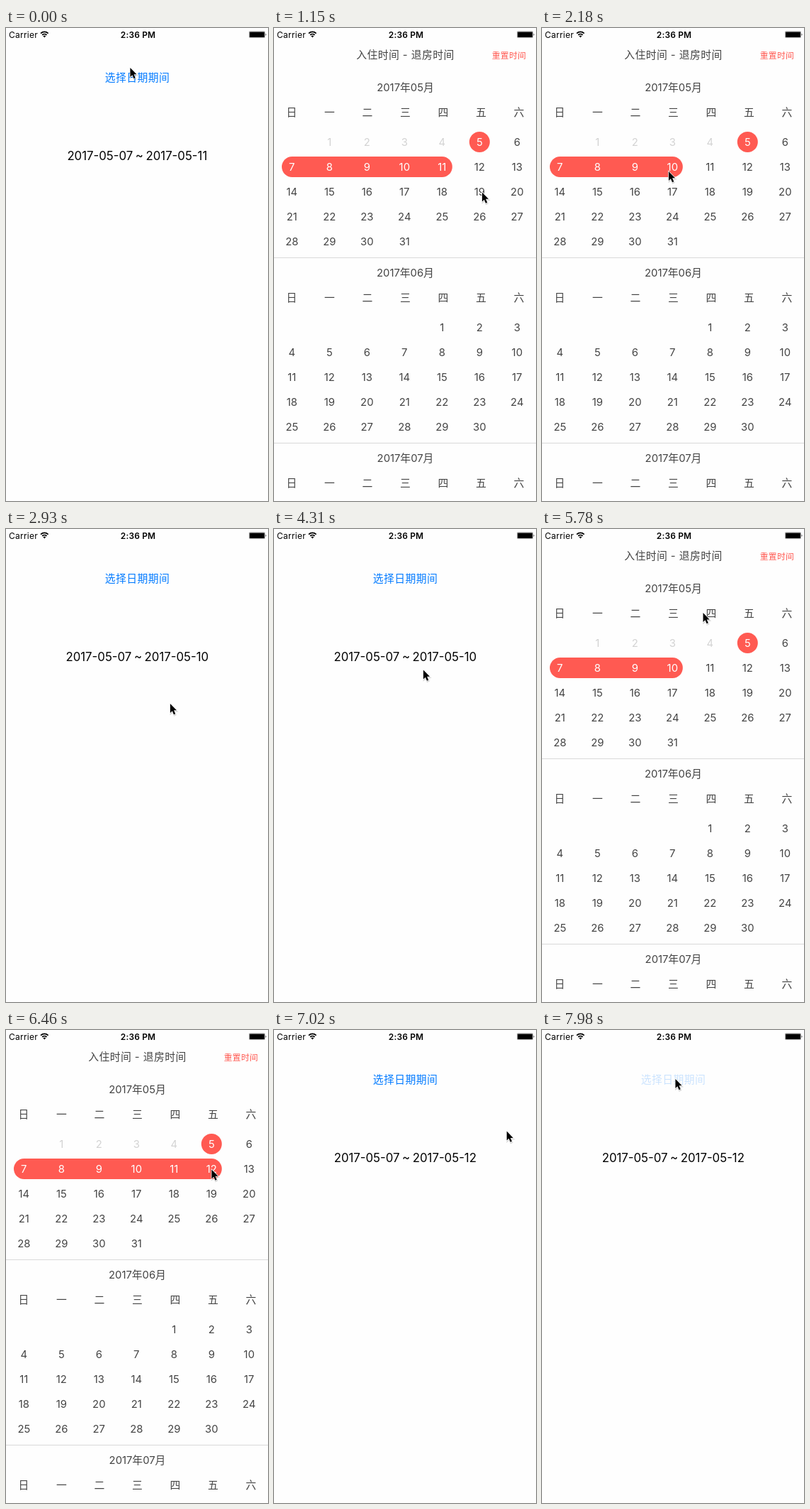
Animation of 370 by 666 pixels, one loop 8000 ms. Source, as an HTML page:

```html
<!DOCTYPE html>
<html lang="zh">
<head>
<meta charset="utf-8">
<title>Date range picker</title>
<style>
  html, body { margin: 0; width: 100%; height: 100%; overflow: hidden; background: #fefefe; }
  svg { display: block; width: 370px; height: 666px; }
  text { font-family: Inter, "Noto Sans CJK SC", "Noto Sans CJK", sans-serif; font-size: 14.8px; fill: #444; text-anchor: middle; }
  .cjk { letter-spacing: .45px; }
</style>
</head>
<body>
<svg viewBox="0 0 370 666">
  <defs>
    <clipPath id="reveal"><rect id="mask" width="370" height="0"/></clipPath>
    <path id="arrow" d="M0 0V15.2L3.4 12L5.9 17.8L8.5 16.7L6 11H10.6Z"/>
  </defs>
  <rect width="370" height="666" fill="#fefefe"/>
  <g id="home"></g>
  <g id="panel" clip-path="url(#reveal)"><rect width="370" height="666" fill="#fefefe"/></g>
  <g id="status">
    <path d="M49 7.6a7.6 7.6 0 0 1 10.6 0M51.1 9.8a4.7 4.7 0 0 1 6.4 0" fill="none" stroke="#000" stroke-width="1.7"/>
    <path d="M54.3 13.4l-2-2.1a3 3 0 0 1 4 0z"/>
    <rect x="343.3" y="4.8" width="22.4" height="8.8" rx="1.2" fill="none" stroke="#777" stroke-width=".6"/>
    <rect x="344" y="5.5" width="21" height="7.4" rx=".5"/>
    <path d="M366.6 7.4q1.8 1.8 0 3.6z"/>
  </g>
  <g id="cursor">
    <g transform="translate(.9 .9) scale(.86)">
      <use href="#arrow" x=".6" y="1.6" stroke="#000" stroke-width="2" opacity=".15"/>
      <use href="#arrow" stroke="#fff" stroke-width="1.6" paint-order="stroke"/>
    </g>
  </g>
</svg>
<script>
const $ = id => document.getElementById(id);
const LOOP = 8000, RED = '#ff5a52', HEADER = 140, FULL = 666, SLIDE = 160;
const clamp = u => Math.min(1, Math.max(0, u));
const smooth = u => u * u * (3 - 2 * u);

function add(parent, tag, attrs, text) {
  const el = document.createElementNS('http://www.w3.org/2000/svg', tag);
  for (const k in attrs) el.setAttribute(k, attrs[k]);
  if (text !== undefined) el.textContent = text;
  return parent.appendChild(el);
}
const label = (parent, x, y, text, style = '', cls = '') =>
  add(parent, 'text', { x, y, style, class: cls }, text);

// Status bar and first screen
label($('status'), 4, 13.7, 'Carrier', 'font-size:12px;fill:#000;text-anchor:start;letter-spacing:.25px');
label($('status'), 186.5, 13.7, '2:36 PM', 'font-size:11.9px;font-weight:600;fill:#000;letter-spacing:.2px');
const button = label($('home'), 185.6, 74.6, '选择日期期间', 'fill:#007aff', 'cjk');
const range = label($('home'), 185.3, 185.8, '', 'font-size:16.77px;fill:#000;word-spacing:-1.1px');

// Calendar
const panel = $('panel'), colX = c => 25.3 + 53 * c, rowY = r => 160.5 + 35 * r;
label(panel, 185.5, 43.4, '入住时间 - 退房时间', '', 'cjk');
label(panel, 332, 42.6, '重置时间', `font-size:11.84px;fill:${RED};letter-spacing:.3px`);
add(panel, 'circle', { cx: colX(5), cy: rowY(0), r: 14.5, fill: RED });
const bar = add(panel, 'rect', { x: 11, y: 181, height: 29, rx: 14.5, fill: RED });

const days = [];
for (let m = 0; m < 3; m++) {
  const top = 261 * m, month = 5 + m;
  const first = new Date(2017, month - 1, 1).getDay();
  const count = new Date(2017, month, 0).getDate();
  if (m) add(panel, 'rect', { x: 0, y: top + 62, width: 370, height: 1, fill: '#d9d9d9' });
  label(panel, 185.5, top + 89.3, `2017年0${month}月`);
  [...'日一二三四五六'].forEach((d, c) => label(panel, 25 + 53.5 * c, top + 124.3, d));
  for (let d = 1; d <= count; d++) {
    const cell = first + d - 1;
    const el = label(panel, colX(cell % 7), top + rowY(Math.floor(cell / 7)) + 5.4, d);
    if (!m) days[d] = el;
  }
}

// Each visit to the calendar picks a new last day
const visits = [
  { press: 410, open: 480, pick: 2180, close: 2600, day: 10 },
  { press: 5160, open: 5340, pick: 6460, close: 6560, day: 12 },
  { press: 7870, open: LOOP, pick: LOOP, close: LOOP }
];
const dayAt = (t, event) => visits.reduce((day, v) => t >= v[event] ? v.day : day, 11);

// The header shows at once, the rows unroll below it and roll up again
function panelHeight(t) {
  const v = visits.find(v => t >= v.open && t < v.close + SLIDE);
  if (!v) return 0;
  const u = t < v.close ? clamp((t - v.open) / SLIDE) : 1 - (t - v.close) / SLIDE;
  return HEADER + (FULL - HEADER) * u ** 3;
}

// Pointer moves: start, end, x, y, sideways bend
const moves = [
  [60, 170, 176, 65, 0],
  [880, 1150, 293, 230.5, .85],
  [1150, 1590, 176.5, 196, 0],
  [1710, 1880, 178, 201, 0],
  [2680, 2930, 231, 245, 0],
  [2930, 3400, 221, 250, 0],
  [3450, 4310, 210, 197.5, 0],
  [4600, 5100, 186.5, 67, 0],
  [5500, 6160, 289.5, 195.5, 0],
  [6700, 7180, 341, 123, 0],
  [7360, 7690, 187.5, 68, 0]
];

function pointer(t) {
  let x = 174.5, y = 55;
  for (const [t0, t1, x1, y1, bend] of moves) {
    const u = smooth(clamp((t - t0) / (t1 - t0)));
    const dx = x1 - x, dy = y1 - y, side = 2 * u * (1 - u) * bend;
    x += dx * u + dy * side;
    y += dy * u - dx * side;
    if (u < 1) break;
  }
  return [x, y];
}

function draw(t) {
  const last = dayAt(t, 'pick');
  range.textContent = `2017-05-07 ~ 2017-05-${dayAt(t, 'close')}`;
  button.style.opacity = visits.some(v => t >= v.press && t < v.open + SLIDE) ? .2 : 1;
  $('mask').setAttribute('height', panelHeight(t));
  bar.setAttribute('width', colX(last - 7) + 14.5 - 11);
  days.forEach((el, d) => {
    el.style.fill = d < 5 ? '#d3d3d3' : d === 5 || (d > 6 && d <= last) ? '#fff' : '#444';
  });
  $('cursor').setAttribute('transform', `translate(${pointer(t)})`);
}

const start = performance.now();
function tick() {
  draw((performance.now() - start) % LOOP);
  requestAnimationFrame(tick);
}
tick();
</script>
</body>
</html>
```
